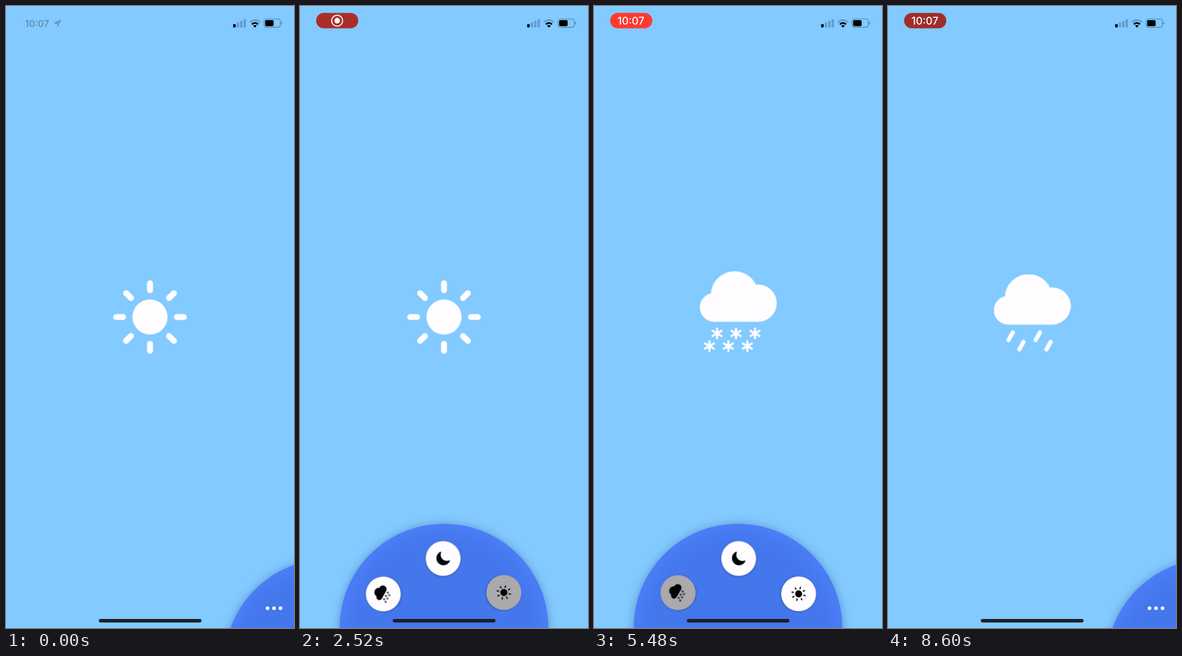
Recreate the animation shown at these times as an HTML page. Size 509 by 1101 pixels, loop 8640 ms.

```html
<!DOCTYPE html>
<html lang="en">
<head>
<meta charset="utf-8">
<title>Weather wheel</title>
<style>
  @property --open { syntax: "<number>"; inherits: true; initial-value: 0; }

  html, body { margin: 0; width: 100%; height: 100%; overflow: hidden; background: #82caff; }
  svg { display: block; width: 100vw; height: 100vh; }
  text { font-family: Inter, Roboto, sans-serif; font-weight: 500; text-anchor: middle; }

  :root { --loop: 8640ms linear infinite; }

  /* wheel */
  .wheel {
    transform: translate(calc(254.5px + 316px * (1 - var(--open))),
                         calc(1101px + 62.3px * (1 - var(--open))));
    animation: open var(--loop);
  }
  .disc { fill: url(#blue); filter: drop-shadow(0 1px 8px rgba(30, 50, 130, .38)); }
  .dots { fill: #fffdff; opacity: calc(1 - var(--open)); }
  .ring { opacity: var(--open); }
  .spin { animation: spin var(--loop); }
  .face { fill: #fffdff; filter: drop-shadow(0 1px 1.8px rgba(0, 0, 0, .38)); }
  .tint { fill: rgba(0, 0, 0, .33); }
  .item { color: #040406; }
  .main { color: #fffdff; }

  /* both moves follow one underdamped spring */
  @keyframes open {
    0% { --open: 0; }
    12.5% {
      --open: 0;
      animation-timing-function: linear(0, .0387 3.57%, .1325 7.14%, .386, .631, .815, .933, .996 50%,
        1.023, 1.028, 1.024, 1.017, 1.01, 1.005, 1.002, 1);
      animation-timing-function: linear(0, .0387 3.57%, .1325 7.14%, .386 14.29%, .631, .815, .933, .996 42.86%,
        1.023, 1.028, 1.024, 1.017, 1.01, 1.005, 1.002, 1);
    }
    20.602% { --open: 1; }
    82.535% {
      --open: 1;
      animation-timing-function: linear(0, .0387 3.57%, .1325 7.14%, .386 14.29%, .631, .815, .933, .996 42.86%,
        1.023, 1.028, 1.024, 1.017, 1.01, 1.005, 1.002, 1);
    }
    90.637%, 100% { --open: 0; }
  }
  @keyframes spin {
    0% { transform: rotate(0deg); }
    21.991% { transform: rotate(0deg); animation-timing-function: cubic-bezier(.65, 0, .35, 1); }
    30.093% { transform: rotate(60deg); }
    62.616% { transform: rotate(60deg); animation-timing-function: cubic-bezier(.65, 0, .35, 1); }
    70.602%, 100% { transform: rotate(120deg); }
  }

  /* selected weather */
  .sun, .moon, .snow, .rain { animation: 8640ms step-end infinite; }
  .sun { animation-name: sun; }
  .moon { animation-name: moon; }
  .snow { animation-name: snow; }
  .rain { animation-name: rain; }
  @keyframes sun { 0% { opacity: 1; } 36.227%, 100% { opacity: 0; } }
  @keyframes moon { 0%, 54.167%, 100% { opacity: 0; } 36.227% { opacity: 1; } }
  @keyframes snow { 0%, 76.736%, 100% { opacity: 0; } 54.167% { opacity: 1; } }
  @keyframes rain { 0% { opacity: 0; } 76.736%, 100% { opacity: 1; } }

  /* taps */
  .tap { animation: 8640ms ease-in-out infinite; }
  .tap-moon { animation-name: tap-moon; }
  .tap-snow { animation-name: tap-snow; }
  .tap-rain { animation-name: tap-rain; }
  @keyframes tap-moon { 0%, 34.722%, 39.12%, 100% { opacity: 1; } 36.227% { opacity: .25; } }
  @keyframes tap-snow { 0%, 52.662%, 57.06%, 100% { opacity: 1; } 54.167% { opacity: .25; } }
  @keyframes tap-rain { 0%, 75.231%, 79.63%, 100% { opacity: 1; } 76.736% { opacity: .25; } }

  /* status bar */
  .idle { animation: idle var(--loop); }
  .pill { animation: pill var(--loop); }
  .pulse { animation: pulse var(--loop); }
  .rec { animation: rec var(--loop); }
  .clock { animation: clock var(--loop); }
  @keyframes idle { 0% { opacity: .32; } 2%, 100% { opacity: 0; } }
  @keyframes pill { 0%, .8% { opacity: 0; } 4.6%, 100% { opacity: 1; } }
  @keyframes pulse {
    0% { fill: #d8342e; }
    7.407%, 30.556%, 53.704%, 76.852%, 100% {
      fill: #982d2a; animation-timing-function: cubic-bezier(.3, .4, .5, 1);
    }
    18.981%, 42.13%, 65.278%, 88.426% {
      fill: #ff3a30; animation-timing-function: cubic-bezier(.5, 0, .7, .6);
    }
  }
  @keyframes rec { 0%, 35.648% { opacity: 1; } 39.12%, 100% { opacity: 0; } }
  @keyframes clock { 0%, 35.648% { opacity: 0; } 39.12%, 100% { opacity: 1; } }
</style>
</head>
<body>
<svg viewBox="0 0 509 1101" preserveAspectRatio="none">
  <defs>
    <radialGradient id="blue">
      <stop offset=".82" stop-color="#4476ec"/>
      <stop offset="1" stop-color="#4a7ef6"/>
    </radialGradient>

    <path id="ray" d="M0-47.6V-59.8" stroke="currentColor" stroke-width="10.6" stroke-linecap="round"/>
    <g id="rays">
      <use href="#ray"/>
      <use href="#ray" transform="rotate(90)"/>
      <use href="#ray" transform="rotate(180)"/>
      <use href="#ray" transform="rotate(270)"/>
    </g>
    <g id="sun">
      <circle r="31" fill="currentColor"/>
      <use href="#rays"/>
      <use href="#rays" transform="rotate(45)"/>
    </g>

    <path id="moon" fill="currentColor" transform="scale(.2666) translate(-256 -256)"
      d="M264 480A232 232 0 0 1 32 248c0-94 54-178.3 137.6-214.7a16 16 0 0 1 21 21C181 76.4 176 104.7 176 136c0 110.3 89.7 200 200 200 31.3 0 59.6-5 81.6-14.7a16 16 0 0 1 21 21C442.3 426 358 480 264 480z"/>

    <g id="cloud" fill="currentColor">
      <circle cx="-6" cy="-39" r="42"/>
      <circle cx="-42" cy="-17" r="25.5"/>
      <circle cx="35.5" cy="-24.5" r="33"/>
      <path d="M-42-24H35.5V8.5H-42z"/>
    </g>

    <path id="flake" d="M0-8.7V8.7M-8-4.6L8 4.6M-8 4.6L8-4.6"
      stroke="currentColor" stroke-width="3.8" stroke-linecap="round"/>
    <g id="flakes">
      <use href="#flake" x="-33.5"/>
      <use href="#flake"/>
      <use href="#flake" x="33.5"/>
    </g>
    <g id="snow">
      <use href="#cloud"/>
      <use href="#flakes" x="-3.5" y="29"/>
      <use href="#flakes" x="-17" y="51.5"/>
    </g>

    <path id="drops" d="M0 0L-7.5 13.3M19 16.6L11.5 29.9"
      stroke="currentColor" stroke-width="7.4" stroke-linecap="round"/>
    <g id="rain">
      <use href="#cloud" y="5"/>
      <use href="#drops" x="-34" y="27.5"/>
      <use href="#drops" x="14" y="27.5"/>
    </g>

    <g id="partly">
      <use href="#sun" transform="translate(29 8) scale(.74)"/>
      <use href="#cloud" color="#fffdff" transform="translate(-25 36) scale(.88) translate(0 36)"/>
      <use href="#cloud" transform="translate(-25 36) scale(.78) translate(0 36)"/>
    </g>
  </defs>

  <rect width="509" height="1101" fill="#82caff"/>

  <g class="main" transform="translate(254.5 550.5)">
    <use class="sun" href="#sun"/>
    <use class="moon" href="#moon"/>
    <use class="snow" href="#snow"/>
    <use class="rain" href="#rain"/>
  </g>

  <g class="wheel">
    <circle class="disc" r="184.5"/>
    <g class="ring">
      <g class="spin">
        <g class="item" transform="rotate(60) translate(0 -123)">
          <circle class="face" r="30.8"/>
          <use href="#partly" transform="scale(.2)"/>
        </g>
        <g class="item" transform="translate(0 -123)">
          <circle class="face" r="30.8"/>
          <circle class="tint sun" r="30.8"/>
          <use href="#sun" transform="scale(.2)"/>
        </g>
        <g class="item tap tap-moon">
          <g transform="rotate(-60) translate(0 -123)">
            <circle class="face" r="30.8"/>
            <circle class="tint moon" r="30.8"/>
            <use href="#moon" transform="scale(.2)"/>
          </g>
        </g>
        <g class="item tap tap-snow">
          <g transform="rotate(-120) translate(0 -123)">
            <circle class="face" r="30.8"/>
            <circle class="tint snow" r="30.8"/>
            <use href="#snow" transform="scale(.2)"/>
          </g>
        </g>
        <g class="item tap tap-rain">
          <g transform="rotate(180) translate(0 -123)">
            <circle class="face" r="30.8"/>
            <circle class="tint rain" r="30.8"/>
            <use href="#rain" transform="scale(.2)"/>
          </g>
        </g>
      </g>
    </g>
    <g class="dots">
      <circle cx="-108.3" cy="-97.3" r="3.2"/>
      <circle cx="-96.8" cy="-97.3" r="3.2"/>
      <circle cx="-85.3" cy="-97.3" r="3.2"/>
    </g>
  </g>

  <rect x="164" y="1085" width="181.5" height="6.2" rx="3.1" fill="#1e1f25"/>

  <g class="idle">
    <text x="55" y="36.6" font-size="16.5">10:07</text>
    <path d="M96.3 25.5L86 30.2H91.3V35.7z" fill="none" stroke="#000" stroke-width="1.4" stroke-linejoin="round"/>
  </g>
  <g class="pill">
    <rect class="pulse" x="28.5" y="12.3" width="74.5" height="27.2" rx="13.6"/>
    <g class="rec">
      <circle cx="65.7" cy="26" r="9.7" fill="none" stroke="#fff" stroke-width="1.8"/>
      <circle cx="65.7" cy="26" r="4.9" fill="#fff"/>
    </g>
    <text class="clock" x="65.3" y="32.7" font-size="18.5" fill="#fff">10:07</text>
  </g>

  <g fill="#649fd3">
    <rect x="407.6" y="29.3" width="4.4" height="8.7" rx="1"/>
    <rect x="413.7" y="26.3" width="4.4" height="11.7" rx="1"/>
    <rect x="419.8" y="23.2" width="4.4" height="14.8" rx="1"/>
  </g>
  <rect x="401.5" y="32" width="4.4" height="6" rx="1"/>
  <g fill="none" stroke-width="3">
    <path d="M431 29A12 12 0 0 1 449 29" stroke="#649fd3"/>
    <path d="M434.6 32.4A7.2 7.2 0 0 1 445.4 32.4" stroke="#000"/>
  </g>
  <path d="M440 38.2l-3.2-3.2a4.6 4.6 0 0 1 6.4 0z"/>
  <rect x="456.2" y="23" width="28.7" height="14.7" rx="4.2" fill="none" stroke="#4f7ea6" stroke-width="1.2"/>
  <rect x="458" y="25" width="15" height="10.8" rx="2.3"/>
  <path d="M486.4 28a2.7 2.7 0 0 1 0 5z" fill="#4f7ea6"/>
</svg>
</body>
</html>
```
